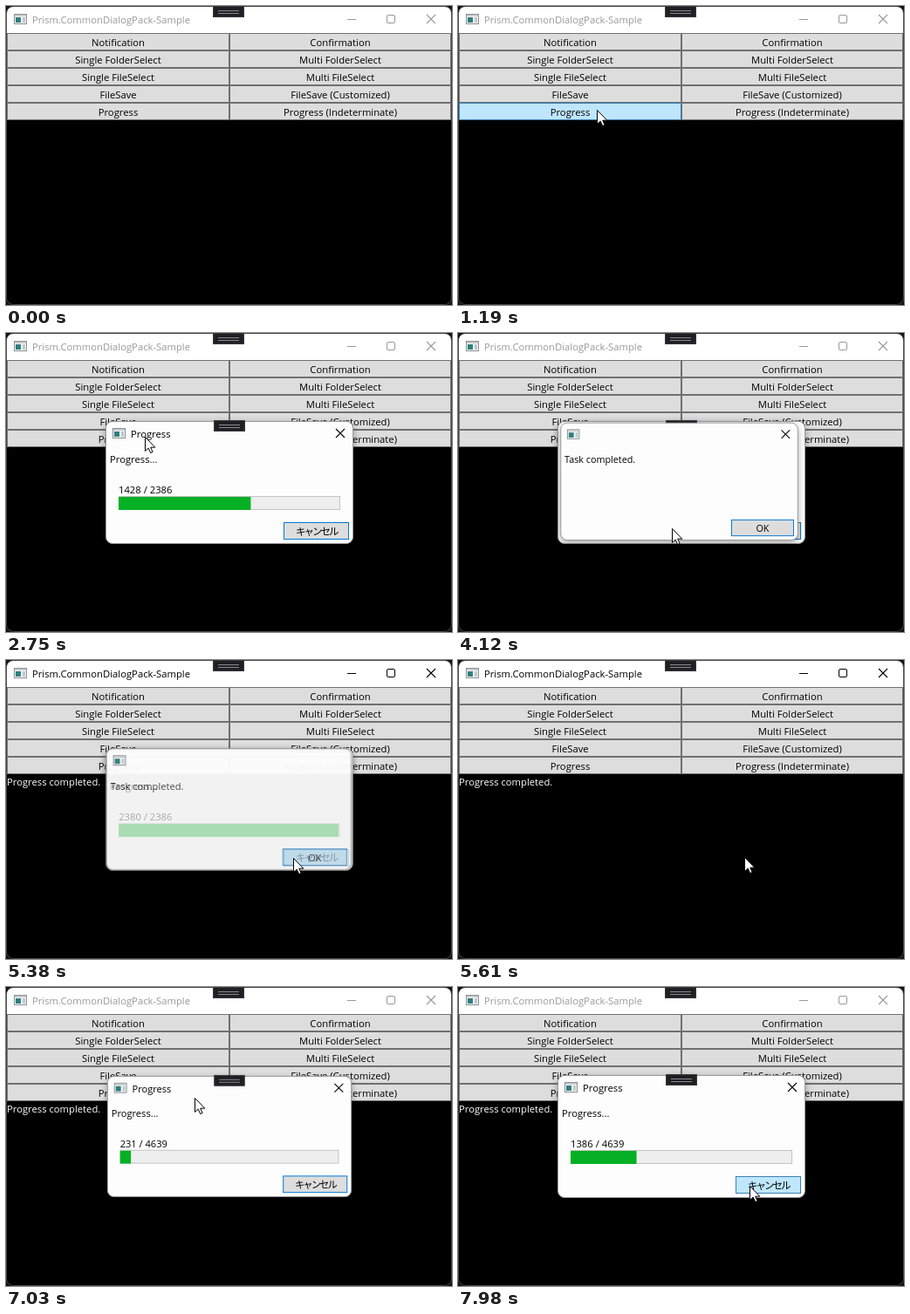
Animation of 511 by 343 pixels, one loop 8000 ms. Source, as an HTML page:

```html
<!DOCTYPE html>
<html lang="en">
<head>
<meta charset="utf-8">
<title>Dialog sample</title>
<style>
  html, body { margin: 0; width: 100%; height: 100%; overflow: hidden; background: #141414; }
  svg { display: block; width: 100vw; height: 100vh; }
  text { font: 11.25px "Open Sans", "Noto Sans", sans-serif; fill: #000; white-space: pre; }
  .jp { font: 11.5px "Noto Sans CJK JP", "Noto Sans CJK", sans-serif; letter-spacing: -2px; }
  .caption { fill: currentColor; }
  .line { fill: none; stroke: currentColor; }
  .button { fill: #ddd; stroke: #707070; }
  .default { stroke: #0078d7; }
  .hover { fill: #bee6fd; stroke: #3c7fb1; }
  .pressed { fill: #c4e5f6; stroke: #2c628b; }
  .dialog { filter: drop-shadow(0 3px 4px rgba(0, 0, 0, .35)); }
</style>
</head>
<body>
<svg viewBox="0 0 511 343">
  <defs>
    <g id="icon">
      <rect x=".5" y=".5" width="14" height="11" fill="#f4f4f4" stroke="#8a8f94"/>
      <path d="M1 2H14" stroke="#c8ccd0" stroke-width="2"/>
      <rect x="2" y="4" width="6" height="6" fill="#2f7f80"/>
      <rect x="10" y="4" width="3" height="6" fill="#c3c8cc"/>
    </g>
    <g id="debugBar">
      <rect x=".5" y=".5" width="35" height="12" fill="#1f1f24" stroke="#3a3a40"/>
      <path d="M6 5.5H30M6 8.5H30" stroke="#8a8a8a"/>
    </g>
    <path id="cross" class="line" d="M0 0L10 10M10 0L0 10" stroke-width="1.1"/>
  </defs>

  <rect width="511" height="343" fill="#141414"/>
  <rect x=".5" y=".5" width="510" height="342" rx="8" fill="#000" stroke="#484848"/>
  <path d="M1 31V8a7 7 0 0 1 7-7H503a7 7 0 0 1 7 7V31Z" fill="#fff"/>
  <use href="#icon" x="9" y="9"/>
  <g id="mainCaption">
    <text class="caption" x="30" y="20">Prism.CommonDialogPack-Sample</text>
    <path class="line" d="M391 15.5H401"/>
    <rect class="line" x="436.5" y="10.5" width="9" height="9" rx="1.5"/>
    <use href="#cross" x="482" y="10"/>
  </g>
  <use href="#debugBar" x="237"/>
  <g id="mainButtons"></g>
  <text id="result" x="1" y="144" style="fill:#fff">Progress completed.</text>

  <g id="progressDialog" class="dialog">
    <rect x="114.5" y="101.5" width="283" height="140" rx="7.5" fill="#fdfdfd" stroke="#9a9a9a"/>
    <use href="#icon" x="122" y="109"/>
    <g class="chrome">
      <text x="143" y="120">Progress</text>
      <use href="#cross" x="378" y="110"/>
      <use href="#debugBar" x="238" y="100"/>
    </g>
    <text x="119" y="149">Progress...</text>
    <text id="count" x="129" y="184"></text>
    <rect x="129.5" y="187.5" width="253" height="15" fill="#eee" stroke="#c4c4c4"/>
    <rect id="bar" x="129" y="188" height="15" fill="#06b025"/>
    <rect id="cancel" x="318.5" y="217.5" width="74" height="19"/>
    <text class="jp" x="332" y="231.5">キャンセル</text>
  </g>

  <g id="taskDialog" class="dialog">
    <rect x="114.5" y="101.5" width="283" height="140" rx="7.5" fill="#fdfdfd" stroke="#9a9a9a"/>
    <use href="#icon" x="122" y="109"/>
    <g class="chrome"><use href="#cross" x="378" y="110"/></g>
    <text x="119" y="149">Task completed.</text>
    <rect id="ok" x="318.5" y="217.5" width="74" height="19"/>
    <text x="355.5" y="232" text-anchor="middle">OK</text>
  </g>

  <g id="cursor">
    <circle id="click" r="12" cx="-1" fill="#f2ee20" opacity=".62"/>
    <path d="M.5 .5V16.5L4.2 13.1L6.7 18.6L9.1 17.5L6.7 12.2H11.8Z" fill="#fff" stroke="#000"/>
  </g>
</svg>
<script>
const LOOP = 8000;
const $ = id => document.getElementById(id);
const clamp = v => Math.min(1, Math.max(0, v));
const within = (t, [from, to]) => t >= from && t < to;

const LABELS = [
  'Notification', 'Confirmation',
  'Single FolderSelect', 'Multi FolderSelect',
  'Single FileSelect', 'Multi FileSelect',
  'FileSave', 'FileSave (Customized)',
  'Progress', 'Progress (Indeterminate)'
];
$('mainButtons').innerHTML = LABELS.map((label, i) => {
  const x = i % 2 ? 256 : 1, y = 31 + 20 * (i >> 1), width = i % 2 ? 254 : 255;
  return `<rect class="button" x="${x + .5}" y="${y + .5}" width="${width - 1}" height="19"/>
    <text x="${x + width / 2}" y="${y + 15}" text-anchor="middle">${label}</text>`;
}).join('');
const mainButtons = [...$('mainButtons').querySelectorAll('rect')];

// Pointer stops: time, x, y
const STOPS = [
  [230, 443, 344], [600, 245, 160], [850, 168, 104], [1030, 159, 113], [1190, 159, 119],
  [3080, 159, 119], [3840, 245, 224], [4250, 245, 224], [4640, 338, 233], [4730, 329, 227],
  [5560, 329, 227], [6350, 216, 133], [6430, 216, 127], [7150, 216, 127], [7350, 207, 178],
  [7450, 207, 178], [7650, 240, 204], [7900, 338, 233], [7980, 334, 228]
];
const CLICKS = [[1340, 1500], [4960, 5150], [6620, 6860]];
const RUNS = [
  { open: 1520, close: 5358, start: 1464, tick: 107, total: 2386 },
  { open: 6900, close: Infinity, start: 6724, tick: 209, total: 4639 }
];
const TASK = { open: 4040, close: 5320 };
const ACTIVE = [[1340, 1520], [5320, 6900]];
const STALL = [5380, 5480];

function pointerAt(t) {
  if (t < STOPS[0][0]) return [-50, -50];
  const next = STOPS.findIndex(stop => stop[0] > t);
  if (next < 0) return STOPS.at(-1).slice(1);
  const [t0, x0, y0] = STOPS[next - 1], [t1, x1, y1] = STOPS[next];
  const p = (t - t0) / (t1 - t0), e = p * p * (3 - 2 * p);
  return [x0 + (x1 - x0) * e, y0 + (y1 - y0) * e];
}

function styleButton(rect, base, [x, y], enabled, down) {
  const left = +rect.getAttribute('x'), top = +rect.getAttribute('y');
  const over = enabled && x >= left && y >= top &&
    x < left + +rect.getAttribute('width') && y < top + 20;
  rect.setAttribute('class', base + (over ? down ? ' pressed' : ' hover' : ''));
}

// Windows fade and grow when opening, fade and shrink when closing.
function showDialog(dialog, { open, close }, t, cx, cy) {
  const closing = t >= close;
  const rise = clamp((t - open) / 240), fall = clamp((t - close) / 180);
  const opacity = closing ? 1 - fall : clamp(rise * 3);
  const scale = closing ? 1 - .1 * fall * fall : 1 - .14 * (1 - rise) ** 3;
  dialog.setAttribute('opacity', opacity);
  dialog.setAttribute('visibility', opacity > 0 ? 'visible' : 'hidden');
  dialog.setAttribute('transform',
    `translate(${cx} ${cy}) scale(${scale}) translate(${-cx} ${-cy})`);
  dialog.querySelector('.chrome').style.display = closing ? 'none' : '';
}

function draw(t) {
  const pointer = pointerAt(t);
  const down = CLICKS.some(span => within(t, span));
  const run = t < 6000 ? RUNS[0] : RUNS[1];
  const modal = t >= run.open && t < run.close;
  const windowTime = within(t, STALL) ? STALL[0] : t;

  $('mainCaption').style.color = ACTIVE.some(span => within(t, span)) ? '#000' : '#999';
  $('result').setAttribute('visibility', t >= TASK.close ? 'visible' : 'hidden');
  mainButtons.forEach(rect => styleButton(rect, 'button', pointer, !modal, down));

  const ticks = Math.min(20, Math.max(0, Math.floor((t - run.start) / run.tick)));
  const done = ticks * Math.floor(run.total / 20);
  $('count').textContent = `${done} / ${run.total}`;
  $('bar').setAttribute('width', 253 * done / run.total);

  showDialog($('progressDialog'), run, windowTime, 256, 171);
  showDialog($('taskDialog'), TASK, windowTime, 195, 142);
  styleButton($('cancel'), 'button default', pointer, t < TASK.open || t > 6000, down);
  styleButton($('ok'), 'button default', pointer, true, down);

  $('cursor').setAttribute('transform', `translate(${pointer.map(Math.round)})`);
  $('click').setAttribute('visibility', down ? 'visible' : 'hidden');
}

const begin = performance.now();
function frame() {
  draw((performance.now() - begin) % LOOP);
  requestAnimationFrame(frame);
}
frame();
</script>
</body>
</html>
```
